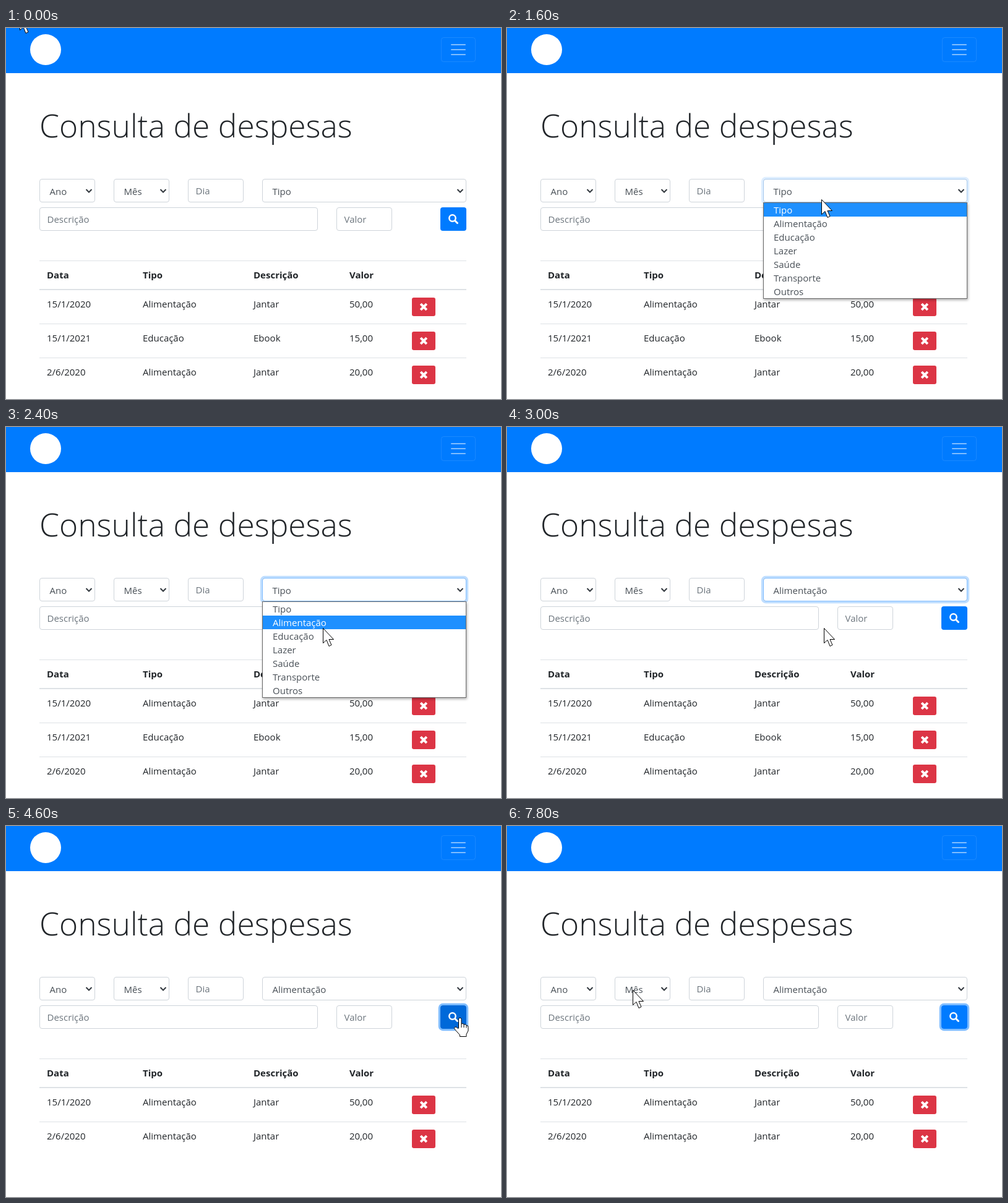
These frames come from a looping animation (800x600 px, 8 s). An HTML page:

```html
<!DOCTYPE html>
<html lang="pt">
<head>
<meta charset="utf-8">
<title>Consulta de despesas</title>
<style>
  html, body { margin: 0; height: 100%; overflow: hidden; background: #fff; }
  svg { display: block; width: 100%; height: 100%; }
  text { font: 15px "Open Sans", "Noto Sans", sans-serif; fill: #212529; }
  .title { font-size: 51.5px; font-weight: 300; }
  .head { font-weight: 700; }
  .value { fill: #495057; }
  .hint { fill: #6c757d; }
  .field { fill: #fff; stroke: #ced4da; }
  .rule { fill: #dee2e6; }
  .glow { fill: none; stroke-width: 3.2; }
  .line { fill: none; stroke: #fff; }
  .menu { filter: drop-shadow(1px 2px 2px #0005); }
  .cursor { fill: #fff; stroke: #000; stroke-linejoin: round; }
</style>
</head>
<body>
<svg viewBox="0 0 800 600">
  <rect width="800" height="73" fill="#007bff"/>
  <circle cx="64" cy="35" r="25" fill="#fff"/>
  <rect class="line" x="703.5" y="15.5" width="55" height="39" rx="4" stroke-opacity=".1"/>
  <path class="line" d="M720 27h22m-22 8h22m-22 8h22" stroke-width="2" stroke-linecap="round" stroke-opacity=".5"/>
  <text class="title" x="54" y="177">Consulta de despesas</text>

  <g id="form"></g>
  <g id="selectFocus">
    <rect class="glow" x="412.4" y="242.4" width="333.2" height="41.2" rx="5.6" stroke="#bfdeff"/>
    <rect x="414.5" y="244.5" width="329" height="37" rx="3.5" fill="none" stroke="#80bdff"/>
  </g>
  <text id="selected" class="value" x="430.5" y="270"></text>

  <rect id="buttonFocus" class="glow" x="700.4" y="288.4" width="45.2" height="41.2" rx="5.6" stroke="#80bdff"/>
  <rect id="button" x="702" y="290" width="42" height="38" rx="4"/>
  <circle class="line" cx="721.5" cy="307.5" r="5.2" stroke-width="2.5"/>
  <path class="line" d="M725.5 311.5l4 4" stroke-width="3" stroke-linecap="round"/>

  <g id="table"></g>

  <g id="menu">
    <rect class="menu" x="414.5" y="282.5" width="329" height="155" fill="#fff" stroke="#6a6a6a"/>
    <rect id="highlight" x="415" width="328" height="22" fill="#1e90ff"/>
    <g id="options"></g>
  </g>

  <path id="arrow" class="cursor" d="M.5.5v24l5.5-5 4 10 4-2-4-9h7.5z"/>
  <path id="hand" class="cursor" d="M8.5 18V3.5a2.2 2.2 0 0 1 4.5 0V11q3.5-1.5 4 1q3.5-1 4 1.5q3.5-.5 3 3V22l-3 6v3.5h-10.5v-2.5l-8-9q-2.5-3 .5-4q2-.5 4.5 2.5zM13 11v6m4-5v5m4-3.5v4"/>
</svg>
<script>
const LOOP = 8000, STEP = 100;
const OPEN = 1600, CHOOSE = 3000, HOVER = 3600, PRESS = 4500, LEAVE = 6800;
const MENU_TOP = 283, OPTION_HEIGHT = 22, ROW_HEIGHT = 55;

const $ = id => document.getElementById(id);
const text = (x, y, label, cls = '') => `<text class="${cls}" x="${x}" y="${y}">${label}</text>`;
const rule = (y, height = 1) => `<rect class="rule" x="54" y="${y}" width="690" height="${height}"/>`;
const field = (x, y, width) =>
  `<rect class="field" x="${x + .5}" y="${y + .5}" width="${width - 1}" height="37" rx="3.5"/>`;
const input = (x, y, width, label) => field(x, y, width) + text(x + 12.5, y + 25, label, 'hint');
const select = (x, width, label) => field(x, 244, width) + text(x + 16.5, 270, label, 'value') +
  `<path d="M${x + width - 14.5} 261l4.5 4.5 4.5-4.5" fill="none" stroke="#343a40" stroke-width="2"/>`;

$('form').innerHTML = select(54, 90, 'Ano') + select(174, 90, 'Mês') + input(294, 244, 90, 'Dia') +
  select(414, 330, '') + input(54, 290, 450, 'Descrição') + input(534, 290, 90, 'Valor');

const options = ['Tipo', 'Alimentação', 'Educação', 'Lazer', 'Saúde', 'Transporte', 'Outros'];
$('options').innerHTML = options.map((label, i) =>
  text(431, MENU_TOP + 17 + OPTION_HEIGHT * i, label, 'value')).join('');

const columns = { Data: 66, Tipo: 221, 'Descrição': 400, Valor: 555 };
const expenses = [
  ['15/1/2020', 'Alimentação', 'Jantar', '50,00'],
  ['15/1/2021', 'Educação', 'Ebook', '15,00'],
  ['2/6/2020', 'Alimentação', 'Jantar', '20,00'],
];
const cells = (labels, y, cls) =>
  Object.values(columns).map((x, i) => text(x, y, labels[i], cls)).join('');

function tableMarkup(rows) {
  const header = rule(376) + cells(Object.keys(columns), 405, 'head') + rule(422, 2);
  return header + rows.map((row, i) => {
    const y = 423 + ROW_HEIGHT * i;
    return (i ? rule(y) : '') + cells(row, y + 29) +
      `<rect x="656" y="${y + 13}" width="38" height="30" rx="3.2" fill="#dc3545"/>
       <path class="line" d="M670.2 ${y + 23.2}l9.6 9.6m0-9.6l-9.6 9.6" stroke-width="4"/>`;
  }).join('');
}
const allRows = tableMarkup(expenses);
const foundRows = tableMarkup(expenses.filter(row => row[1] === options[1]));

const clamp = k => Math.min(1, Math.max(0, k));
const easeOut = k => k * (2 - k);

// Each move eases the pointer on from wherever the one before left it.
const pointerStart = { x: 22, y: -21 };
const pointerMoves = [
  { from: 200, to: 1000, x: 494, y: 303 },
  { from: 1000, to: 1300, x: 508, y: 277 },
  { from: 1800, to: 2000, x: 513, y: 329 },
  { from: 2300, to: 2400, x: 512, y: 325 },
  { from: 3200, to: HOVER, x: 734, y: 311 },
  { from: LEAVE - STEP, to: LEAVE, x: 682, y: 335 },
  { from: LEAVE, to: 7500, x: 154, y: 268 },
  { from: 7500, to: 7800, x: 203, y: 265 },
];
function pointerAt(t) {
  let { x, y } = pointerStart;
  for (const move of pointerMoves) {
    const k = easeOut(clamp((t - move.from) / (move.to - move.from)));
    x += (move.x - x) * k;
    y += (move.y - y) * k;
  }
  return { x: Math.round(x), y: Math.round(y) };
}

const show = (id, visible) => $(id).setAttribute('visibility', visible ? 'visible' : 'hidden');
const place = (id, x, y) => $(id).setAttribute('transform', `translate(${x} ${y})`);
const fade = (id, opacity) => $(id).setAttribute('opacity', opacity);
let shownRows;

function draw(t) {
  const during = (from, to) => t >= from && t < to;
  const { x, y } = pointerAt(t);
  const pointing = during(HOVER, LEAVE);
  show('arrow', !pointing);
  show('hand', pointing);
  place('arrow', x, y);
  place('hand', x - 11, y - 2);

  show('menu', during(OPEN, CHOOSE));
  const active = Math.max(0, Math.floor((y - MENU_TOP) / OPTION_HEIGHT));
  $('highlight').setAttribute('y', MENU_TOP + OPTION_HEIGHT * active);
  [...$('options').children].forEach((option, i) => option.style.fill = i === active ? '#fff' : '');
  $('selected').textContent = options[t < CHOOSE ? 0 : 1];

  const focusIn = start => clamp((t - start + STEP / 2) / STEP);
  fade('selectFocus', focusIn(OPEN) - focusIn(PRESS));
  fade('buttonFocus', focusIn(PRESS));
  $('button').setAttribute('fill', during(HOVER, LEAVE + STEP) ? '#0069d9' : '#007bff');

  const rows = t < PRESS + STEP ? allRows : foundRows;
  if (rows !== shownRows) $('table').innerHTML = shownRows = rows;
}

const start = performance.now();
function tick() {
  const t = (performance.now() - start) % LOOP;
  draw(Math.floor(t / STEP) * STEP);
  requestAnimationFrame(tick);
}
tick();
</script>
</body>
</html>
```
